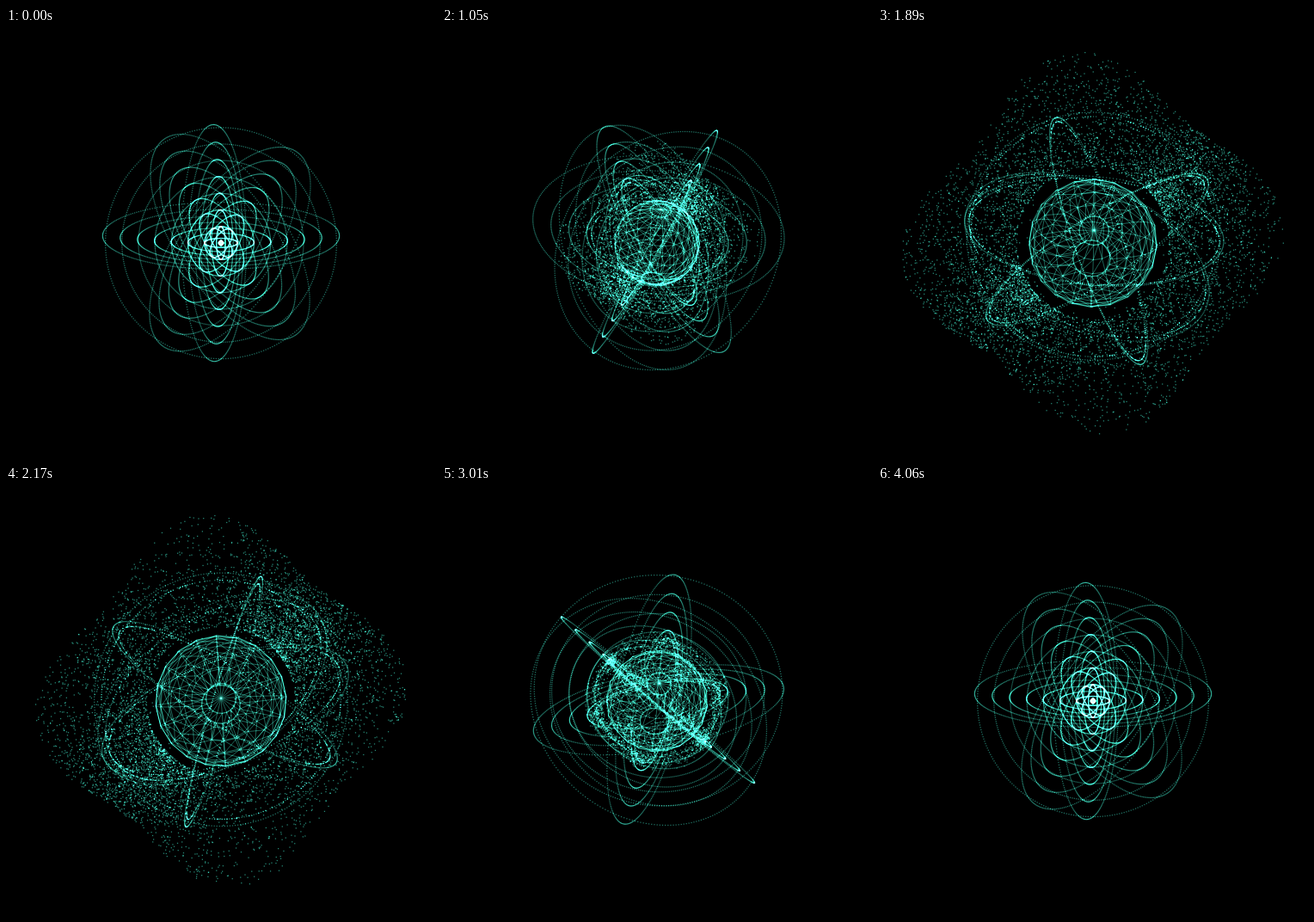
Write an HTML page with a canvas that moves like this. It is 500x500 px and loops after 4.27 s.

```html
<!DOCTYPE html>
<html lang="en">
<head>
<meta charset="utf-8">
<title>Orbit sphere</title>
<style>
html, body { margin: 0; width: 100%; height: 100%; overflow: hidden; background: #000; }
canvas { display: block; width: 500px; height: 500px; }
</style>
</head>
<body>
<canvas id="stage" width="500" height="500"></canvas>
<script>
const ctx = document.getElementById('stage').getContext('2d');
const STEP = 70, LAST = 58, LOOP = 4270, DEPTH = 600;
const SHELLS = 7, DOTS = 300, SPACING = 19.2;
const ROWS = 12, COLUMNS = 20;
const { PI, sin, cos, max, min } = Math;
const TAU = PI * 2;

let seed = 20417;
const random = () => {
  seed = (seed * 1664525 + 1013904223) >>> 0;
  return seed / 4294967296;
};

const smooth = x => {
  x = min(1, max(0, x));
  return x * x * (3 - 2 * x);
};

// Unit vectors spanning the plane whose normal has this height and azimuth
function ringPlane(height, degrees) {
  const c = cos(degrees * PI / 180), s = sin(degrees * PI / 180);
  const flat = Math.sqrt(1 - height * height);
  return [[-s, 0, c], [height * c, -flat, height * s]];
}

const rings = [[1, 0], [.07, 15], [.36, -38], [.27, 90], [.6, 158]]
  .map(([height, degrees]) => ringPlane(height, degrees));

const particles = [];
rings.forEach((plane, ring) => {
  for (let shell = 1; shell <= SHELLS; shell++)
    for (let i = 0; i < DOTS; i++)
      particles.push({
        ring, shell,
        angle: i / DOTS * TAU,
        loose: random() < .78,
        reach: random() ** 1.35,
        turn: (random() + random() - 1) * .8
      });
});

// One eased turn drives spin, pitch and roll
function rotation(p) {
  const turn = smooth(p ** 1.3), lift = sin(PI * turn);
  const spin = TAU * turn, pitch = .28 + 1.29 * lift, roll = .6 * lift * (1 - lift);
  const mix = (a, b, angle) => [a * cos(angle) - b * sin(angle), a * sin(angle) + b * cos(angle)];
  return ([x, y, z]) => {
    [x, z] = mix(x, z, spin);
    [y, z] = mix(y, z, pitch);
    [x, y] = mix(x, y, roll);
    return [x, y, z];
  };
}

function project(x, y, z) {
  const scale = DEPTH / (DEPTH - z);
  return [250 + x * scale, 250 + y * scale];
}

function drawParticles(p, rotate, push, burst) {
  const swell = 1 + .097 * sin(PI * p);
  const release = smooth((burst - .1) * 2);
  const planes = rings.map(plane => plane.map(rotate));

  for (const dot of particles) {
    const [a, b] = planes[dot.ring];
    const home = dot.shell * SPACING * swell;
    const radius = max(home, push);
    const c = cos(dot.angle) * radius, s = sin(dot.angle) * radius;
    let [x, y, z] = a.map((component, k) => component * c + b[k] * s);
    const drift = dot.loose ? release * smooth((push - home) / 25) : 0;
    if (drift > 0) {
      let phi = Math.atan2(y, x) + drift * dot.turn;
      phi -= drift * .28 * sin(2 * (phi - 2.5));
      const inner = push * .62;
      const outer = push * 1.58 * (.89 + .1 * cos(4 * (phi + .1)));
      const far = inner + (outer - inner) * dot.reach;
      const flat = Math.hypot(x, y) * (1 - drift) + far * drift;
      x = flat * cos(phi);
      y = flat * sin(phi);
      z *= 1 - drift;
    }
    const [px, py] = project(x, y, z);
    ctx.globalAlpha = drift > .3 ? .6 : .5;
    ctx.fillRect(px - .62, py - .62, 1.24, 1.24);
  }
}

function drawBall(rotate, radius) {
  const vertex = (row, column) => {
    const lat = row / ROWS * PI, lon = column / COLUMNS * TAU;
    const point = [sin(lat) * cos(lon), -cos(lat), sin(lat) * sin(lon)];
    return project(...rotate(point).map(c => c * radius));
  };
  const line = (from, to) => {
    ctx.moveTo(...from);
    ctx.lineTo(...to);
  };

  ctx.globalAlpha = .62;
  for (let row = 1; row < ROWS; row++) {
    const cap = row === 1 || row === ROWS - 1;
    ctx.lineWidth = .7;
    ctx.beginPath();
    for (let column = 0; column < COLUMNS; column++) {
      const here = vertex(row, column);
      line(here, vertex(row - 1, column));
      if (row > 1) line(here, vertex(row - 1, column + 1));
    }
    ctx.stroke();
    ctx.lineWidth = cap ? 1.4 : .7;
    ctx.beginPath();
    for (let column = 0; column < COLUMNS; column++)
      line(vertex(row, column), vertex(row, column + 1));
    ctx.stroke();
  }
}

function draw(p) {
  const rotate = rotation(p);
  const ball = 76 * sin(PI * p ** 1.1);
  const burst = max(0, sin(PI * p ** .85)) ** 3;

  ctx.globalCompositeOperation = 'source-over';
  ctx.globalAlpha = 1;
  ctx.fillStyle = '#000';
  ctx.fillRect(0, 0, 500, 500);
  ctx.globalCompositeOperation = 'lighter';
  ctx.fillStyle = ctx.strokeStyle = 'rgb(62, 230, 200)';
  drawParticles(p, rotate, ball * (1 + .93 * burst), burst);
  drawBall(rotate, max(3, ball));
}

const start = performance.now();
let shown = -1;
function tick() {
  const elapsed = (performance.now() - start) % LOOP;
  const step = min(LAST, Math.floor(elapsed / STEP));
  if (step !== shown) draw((shown = step) / LAST);
  requestAnimationFrame(tick);
}
tick();
</script>
</body>
</html>
```
